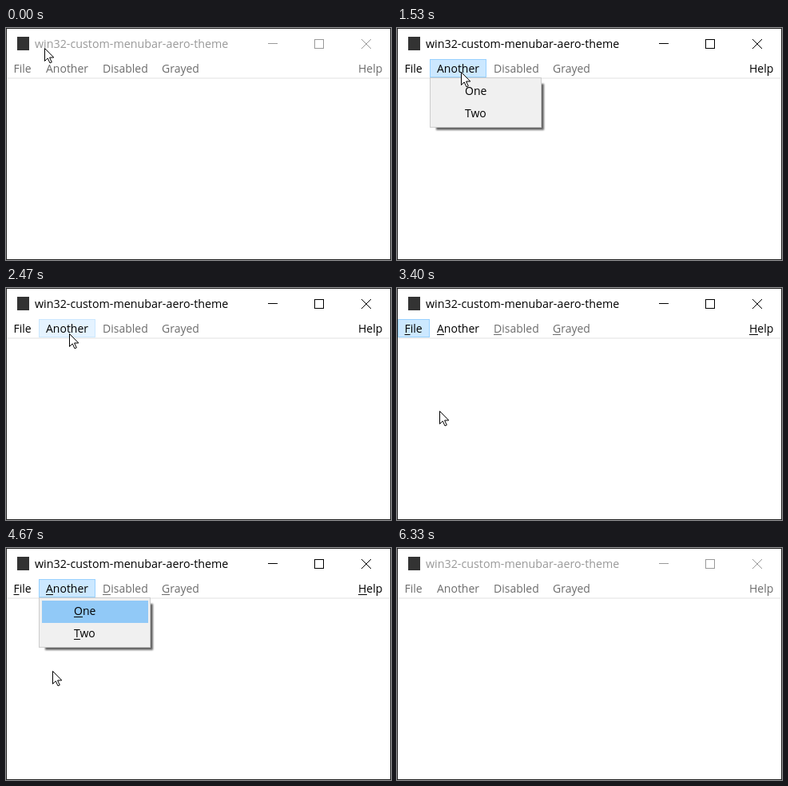
An HTML page for the animation above (6470 ms loop, 482 by 291 pixels).

```html
<!DOCTYPE html>
<html lang="en">
<head>
<meta charset="utf-8">
<title>Menu bar demo</title>
<style>
  html, body { margin: 0; width: 100%; height: 100%; overflow: hidden; background: #fff; }
  svg { display: block; width: 482px; height: 291px; font: 14px "Open Sans", "Noto Sans", sans-serif; }
  .ink { fill: #000; }
  .gray { fill: #6d6d6d; }
  .title { font-size: 14.3px; }
  .lines { fill: none; stroke: #000; }
  .inactive .ink { fill: #6d6d6d; }
  .inactive .title { fill: #999; }
  .inactive .lines { stroke: #999; }
  .key { visibility: hidden; }
  .keys .key { visibility: visible; }
  .item { fill: none; stroke: none; }
  .item.hot { fill: #e5f3ff; stroke: #cce8ff; }
  .item.down { fill: #cce8ff; stroke: #99d1ff; }
  .panel { fill: #f0f0f0; stroke: #ccc; }
  .shadow { fill: #000; opacity: .6; filter: blur(1.3px); }
  .row { fill: #91c9f7; }
</style>
</head>
<body>
<svg id="win" viewBox="0 0 482 291">
  <rect x=".5" y=".5" width="481" height="290" fill="#fff" stroke="#222"/>
  <rect x="14" y="11" width="15" height="17" fill="#333"/>
  <text class="title ink" x="36" y="25">win32-custom-menubar-aero-theme</text>
  <g class="lines">
    <path d="M328 19.5h12M386.5 14.5h11v11h-11z" shape-rendering="crispEdges"/>
    <path d="M445 14l12 12M457 14l-12 12"/>
  </g>
  <rect x="1" y="62" width="480" height="2" fill="#f0f0f0"/>
  <g id="bar"></g>
  <g id="menus"></g>
  <path id="cursor" d="M.5.5v16l3.7-3.6 2.8 6 2.3-1-2.7-5.9h5.2z" fill="#fff" stroke="#000"/>
</svg>
<script>
const $ = id => document.getElementById(id);
const LOOP = 6470, TICK = 1000 / 15;

// Text with a mnemonic line under its first letter
const label = (text, x, y, keyWidth, cls = 'ink') =>
  `<text class="${cls}" x="${x}" y="${y}">${text}</text>` +
  `<rect class="key ${cls}" x="${x}" y="${y + 2}" width="${keyWidth}" height="1"/>`;

const barItem = (id, x, w) =>
  `<rect id="${id}" class="item" x="${x + .5}" y="39.5" width="${w - 1}" height="22"/>`;

const menu = (id, x, w, rows) => {
  const h = rows.length * 28 + 7;
  return `<g id="${id}">
    <rect class="shadow" x="${x + 8}" y="70" width="${w - 5}" height="${h - 5}"/>
    <rect class="panel" x="${x + .5}" y="62.5" width="${w - 1}" height="${h - 1}"/>
    <rect class="row" x="${x + 4}" y="66" width="${w - 7}" height="28"/>
    ${rows.map(([text, k], i) => label(text, x + 44, 84 + i * 28, k)).join('')}</g>`;
};

$('bar').innerHTML =
  barItem('file', 1, 40) + barItem('another', 41, 71) +
  label('File', 9.5, 56, 7) + label('Another', 50, 56, 9) +
  label('Disabled', 121, 56, 10, 'gray') + label('Grayed', 195, 56, 10, 'gray') +
  label('Help', 441, 56, 11);
$('menus').innerHTML =
  menu('fileMenu', 1, 136, [['Exit', 7]]) +
  menu('anotherMenu', 41, 140, [['One', 11], ['Two', 8]]);

// Pointer moves: first tick, last tick, x, y
const moves = [
  [0, 0, 48, 25], [1, 10, 25, 54], [13, 13, 25, 55], [17, 20, 83, 65],
  [23, 23, 80, 55], [25, 28, 26, 56], [32, 37, 79, 57], [39, 40, 48, 152],
  [41, 42, 49, 155], [45, 46, 52, 155], [49, 50, 53, 154], [52, 52, 54, 154],
  [56, 58, 58, 154], [86, 88, 18, 252]
];
const LEAVE = 89;

// Window states by starting tick; fade is the number of ticks a menu takes to appear
const states = [
  { at: 0, inactive: true },
  { at: 5 },
  { at: 8, item: 'file', look: 'hot' },
  { at: 10, item: 'file', look: 'down' },
  { at: 11, item: 'file', look: 'down', open: true, fade: 3 },
  { at: 18, item: 'another', look: 'down', open: true },
  { at: 27, item: 'file', look: 'down', open: true },
  { at: 31, item: 'file', look: 'hot' },
  { at: 33, item: 'another', look: 'hot' },
  { at: 39 },
  { at: 50, item: 'file', look: 'down', keys: true },
  { at: 56, item: 'file', look: 'down', keys: true, open: true, fade: 4 },
  { at: 70, item: 'another', look: 'down', keys: true, open: true },
  { at: 75, item: 'file', look: 'down', keys: true, open: true },
  { at: 81, item: 'file', look: 'down', keys: true },
  { at: 95, inactive: true }
];

function pointer(tick) {
  let x = 0, y = 0;
  for (const [from, to, nx, ny] of moves) {
    if (tick < from) break;
    const p = Math.min(1, (tick - from + 1) / (to - from + 1));
    x += (nx - x) * p;
    y += (ny - y) * p;
  }
  return [Math.round(x), Math.round(y)];
}

function draw(now) {
  const tick = Math.floor((now % LOOP + 3.4) / TICK);
  const s = states.filter(state => state.at <= tick).pop();
  $('win').classList.toggle('inactive', !!s.inactive);
  $('win').classList.toggle('keys', !!s.keys);
  for (const id of ['file', 'another']) {
    const on = s.item === id, panel = $(id + 'Menu');
    $(id).setAttribute('class', on ? 'item ' + s.look : 'item');
    panel.style.display = on && s.open ? '' : 'none';
    panel.style.opacity = Math.min(1, (tick - s.at + 1) / (s.fade || 1));
    panel.querySelector('.row').style.display = s.keys ? '' : 'none';
  }
  $('cursor').setAttribute('transform', `translate(${pointer(tick)})`);
  $('cursor').style.display = tick < LEAVE ? '' : 'none';
}

function loop(now) {
  draw(now);
  requestAnimationFrame(loop);
}
draw(0);
requestAnimationFrame(loop);
</script>
</body>
</html>
```
